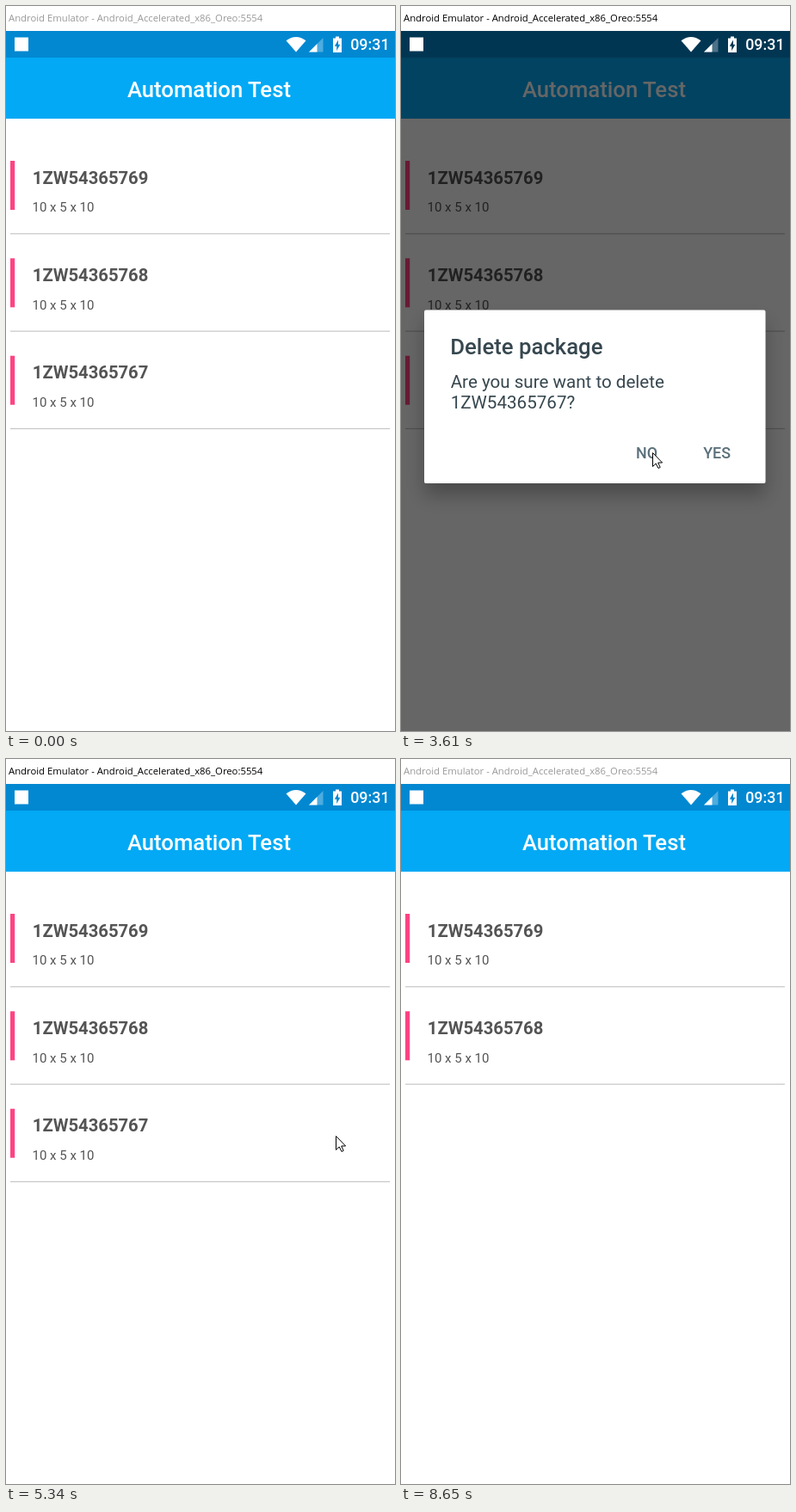
Animation, 452 px wide and 843 px high, one loop 8720 ms. Source, as an HTML page:

```html
<!DOCTYPE html>
<html lang="en">
<head>
<meta charset="utf-8">
<title>Package list</title>
<style>
  html, body { margin: 0; width: 100%; height: 100%; overflow: hidden; background: #fff; }
  svg { display: block; width: 452px; height: 843px; font-family: Roboto, sans-serif; }
  .bar { font: 11.3px "Open Sans", "Noto Sans", sans-serif; }
  .head { font-size: 25.7px; font-weight: 500; }
  .code { font-size: 20.25px; font-weight: 700; fill: #545454; }
  .size { font-size: 15px; fill: #545454; }
  .msg { font-size: 20.6px; fill: #37474f; }
  .btn { font-size: 17.9px; font-weight: 500; }
</style>
</head>
<body>
<svg viewBox="0 0 452 843">
  <defs>
    <clipPath id="list"><rect x="5" y="131" width="441" height="712"/></clipPath>
    <filter id="shadow" x="-20%" y="-20%" width="140%" height="160%">
      <feDropShadow dx="0" dy="14" stdDeviation="11" flood-color="#000" flood-opacity=".27"/>
    </filter>
  </defs>
  <rect width="452" height="843" fill="#fff"/>
  <text id="caption" class="bar" x="3" y="18">Android Emulator - Android_Accelerated_x86_Oreo:5554</text>

  <rect y="29" width="452" height="31" fill="#0288d1"/>
  <rect y="60" width="452" height="71" fill="#03a9f4"/>
  <text class="head" x="140.9" y="106" fill="#fff">Automation Test</text>
  <g clip-path="url(#list)">
    <rect id="reveal" x="5" y="379" width="441" height="113" fill="#ff4081"/>
    <g id="rows"></g>
  </g>
  <rect id="dim" y="29" width="452" height="814"/>

  <g fill="#fff">
    <rect x="10" y="36.5" width="16" height="16"/>
    <path d="M325.5 40.3Q337 31.5 348.5 40.3L337 53.5Z"/>
    <path d="M352 53.5L368.5 37V53.5Z" opacity=".3"/>
    <path d="M352 53.5L361.5 44V53.5Z"/>
    <path fill-rule="evenodd" d="M380 37.5H383V35.5H387V37.5H390V54H380ZM386 39.5L381.8 46.8H384.2V52L388.3 44.8H386Z"/>
    <text class="btn" x="400.2" y="51">09:31</text>
  </g>

  <g id="dialog">
    <rect x="27" y="353.4" width="396.5" height="201.6" rx="2" fill="#fff" filter="url(#shadow)"/>
    <text class="head" x="57.3" y="405" fill="#37474f">Delete package</text>
    <text class="msg" x="57.7" y="444">Are you sure want to delete</text>
    <text class="msg" x="57.7" y="468.3">1ZW54365767?</text>
    <g class="btn" fill="#5b707a">
      <text x="273" y="526.3">NO</text>
      <text x="351.2" y="526.3">YES</text>
    </g>
  </g>
  <path id="cursor" d="M.5 .5V16.5L4.2 13L7 18.5L9.2 17.4L6.7 12H11.6Z" fill="#fff" stroke="#000" stroke-width="1"/>
</svg>
<script>
const LOOP = 8720;
const $ = id => document.getElementById(id);

$('rows').innerHTML = [9, 8, 7].map((digit, i) => `
  <g transform="translate(0 ${152 + 113.35 * i})"><g id="row${i}">
    <rect x="5" y="1" width="441" height="112" fill="#fff"/>
    <rect x="5" y="28" width="5.2" height="57" fill="#ff4483"/>
    <text class="code" x="30.8" y="54.7">1ZW5436576${digit}</text>
    <text class="size" x="30.5" y="87.2">10 x 5 x 10</text>
    <rect x="5" y="112.2" width="441" height="1.2" fill="#c6c6c6"/>
  </g></g>`).join('');

const linear = p => p;
const easeOut = p => p * (2 - p);
const smooth = p => p * p * (3 - 2 * p);

// Pointer moves: first step, last step, step count, end x, end y, easing
const START = [407, 901];
const MOVES = [
  [110, 650, 8, 226, 432, easeOut],
  [1910, 2760, 12, 372, 531, smooth],
  [2840, 2840, 1, 375, 522, linear],
  [3070, 3230, 3, 275, 519, smooth],
  [3530, 3610, 2, 292, 519, linear],
  [4950, 5340, 6, 383, 438, easeOut],
  [5420, 5570, 3, 412, 437, easeOut],
  [5650, 5730, 2, 422, 437, linear],
  [5880, 6710, 12, 3, 456, smooth],
  [7260, 7260, 1, 17, 466, linear],
  [7340, 7940, 9, 455, 880, linear]
];

function pointer(t) {
  let [x, y] = START;
  for (const [from, to, n, endX, endY, ease] of MOVES) {
    if (t < from) break;
    const gap = n > 1 ? (to - from) / (n - 1) : 1;
    const p = ease(Math.min(n, Math.floor((t - from) / gap + 1.05)) / n);
    x += (endX - x) * p;
    y += (endY - y) * p;
  }
  return [Math.round(x), Math.round(y)];
}

// Dialog states: start, screen dimming, dialog opacity
const FADES = [
  [0, 0, 0], [1580, .2, .72], [1660, .43, .95], [1740, .6, 1],
  [4710, .385, .25], [4790, .14, .04], [4870, 0, 0]
];

const show = (id, on) => $(id).setAttribute('visibility', on ? 'visible' : 'hidden');

function draw(t) {
  const [x, y] = pointer(t);
  $('cursor').setAttribute('transform', `translate(${x} ${y})`);
  show('cursor', t >= 110 && t < 7940);
  $('caption').setAttribute('fill', t >= 890 && t < 8650 ? '#000' : '#999');

  const [, dim, alpha] = FADES.filter(f => f[0] <= t).pop();
  $('dim').setAttribute('opacity', dim);
  $('dialog').setAttribute('opacity', alpha);

  const swiping = t >= 5880 && t < 6790;
  show('reveal', swiping);
  show('row2', t < 6790);
  $('row2').setAttribute('transform', `translate(${swiping ? x - 422 : 0} 0)`);
}

function tick() {
  draw(performance.now() % LOOP);
  requestAnimationFrame(tick);
}
tick();
</script>
</body>
</html>
```
